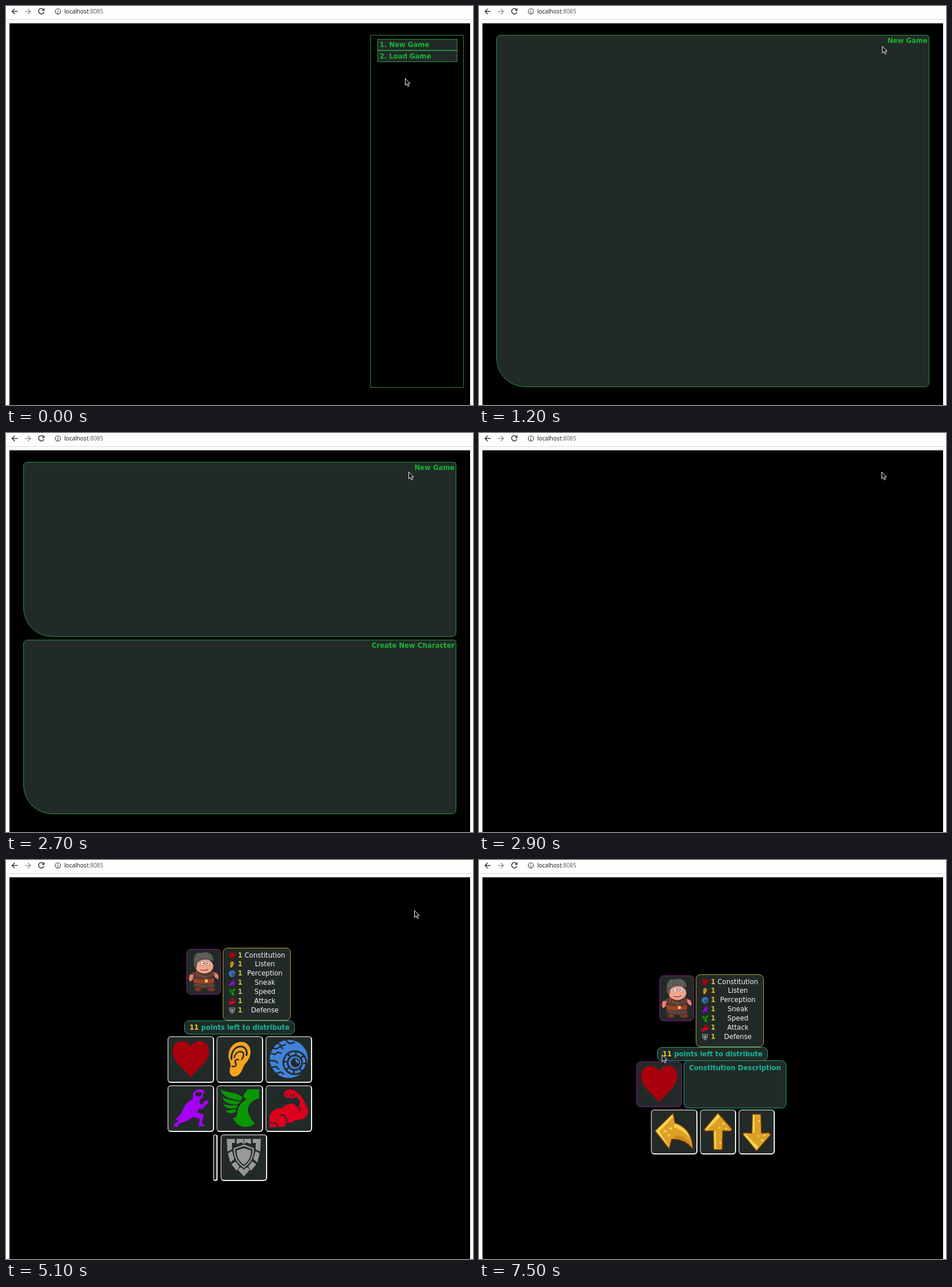
An HTML page for the animation above (8000 ms loop, 810x691 px).

```html
<!DOCTYPE html>
<html lang="en">
<head>
<meta charset="utf-8">
<title>Character creation</title>
<style>
  :root { --panel: #222a28; --line: #27913c; --green: #17b532; --teal: #14b698; --gold: #d3bf2b; }
  html, body { margin: 0; width: 100%; height: 100%; overflow: hidden; background: #fefffc; }
  #stage { position: relative; width: 810px; height: 691px; overflow: hidden; font: 11.6px/18px "DejaVu Sans", sans-serif; }
  #stage div, #stage svg { position: absolute; box-sizing: border-box; white-space: nowrap; }
  #stage svg { overflow: visible; }
  #stage .scene { inset: 0; }
  .bar { left: 0; top: 0; width: 810px; height: 24px; border-bottom: 1px solid #d6d6d4; }
  .url { left: 101px; top: 0; font: 10px/18px "Noto Sans", sans-serif; color: #222; }
  .url span { color: #666; }
  .game { left: 6px; top: 30px; width: 799px; height: 661px; background: #000; }

  .panel { left: 30px; width: 751px; background: var(--panel); border: 1px solid var(--line); border-radius: 7px 4px 7px 50px; }
  .panel, .item { color: var(--green); font-weight: bold; }
  .panel { text-align: right; padding-right: 2px; }
  .menu { left: 632px; top: 50px; width: 162px; height: 611px; border: 1px solid #2c8741; }
  .item { left: 11px; width: 139px; height: 20px; padding-left: 3px; background: var(--panel); border: 1px solid var(--line); }

  .frame { background: var(--panel); border: 1px solid #8d1590; border-radius: 7px; }
  .table { left: 295px; top: 280px; width: 118px; height: 126px; background: var(--panel); border: 1px solid #a9a433; border-radius: 8px; }
  .row { left: 1px; width: 116px; height: 16px; line-height: 16px; color: #f4f4f4; }
  .row svg { left: 7px; top: 2px; }
  .row b { position: absolute; left: 24px; color: var(--gold); }
  .row div { left: 29px; width: 84px; text-align: center; }
  .teal { background: var(--panel); border: 1px solid #17a184; border-radius: 8px; color: var(--teal); font-weight: bold; text-align: center; }
  .teal b { color: #e3cf2c; }
  .btn { background: var(--panel); border: 2px solid; border-color: #929292 #f0f0f0 #f0f0f0 #929292; border-radius: 6px; }
  .btn svg { left: -2px; top: -2px; }

  .timed { animation: 8s step-end infinite; }
  #start { animation-name: start; }
  #newGame { animation-name: newGame; }
  #pick { animation-name: pick; }
  #create { animation-name: create; }
  #statMenu { animation-name: statMenu; }
  #manual { animation-name: manual; }
  #stats { animation-name: stats; }
  #grid { animation-name: grid; }
  #detail { animation-name: detail; }
  #cursor { left: -.5px; top: -.5px; animation-name: cursor; }
  #arrow { animation-name: arrow; }
  #beam { animation-name: beam; }
  @keyframes start { 0% { visibility: visible } 15%, 100% { visibility: hidden } }
  @keyframes newGame { 0%, 21.25%, 100% { visibility: hidden } 15% { visibility: visible } }
  @keyframes pick { 0%, 33.75%, 100% { visibility: hidden } 21.25% { visibility: visible } }
  @keyframes create { 0%, 36.25%, 100% { visibility: hidden } 33.75% { visibility: visible } }
  @keyframes statMenu { 0%, 60%, 100% { visibility: hidden } 40% { visibility: visible } }
  @keyframes manual { 0%, 63.75%, 100% { visibility: hidden } 60% { visibility: visible } }
  @keyframes grid { 0%, 93.75%, 100% { visibility: hidden } 63.75% { visibility: visible } }
  @keyframes detail { 0% { visibility: hidden } 93.75%, 100% { visibility: visible } }
  @keyframes stats {
    0% { visibility: hidden; transform: none }
    37.5% { visibility: visible; transform: translate(81px, 0) }
    40% { visibility: visible; transform: none }
    60% { visibility: visible; transform: translate(81px, -82px) }
    63.75% { visibility: visible; transform: translate(81px, -128px) }
    93.75%, 100% { visibility: visible; transform: translate(81px, -82px) }
  }
  @keyframes cursor {
    0% { transform: translate(692px, 125px) }
    7.5% { transform: translate(682px, 108px) }
    8.75% { transform: translate(689px, 88px) }
    10% { transform: translate(699px, 69px) }
    28.75% { transform: translate(698px, 67px) }
    40% { transform: translate(698px, 67px); animation-timing-function: steps(4) }
    45% { transform: translate(694px, 128px); animation-timing-function: steps(4) }
    50% { transform: translate(701px, 106px) }
    51.25% { transform: translate(706px, 93px) }
    53.75% { transform: translate(707px, 88px) }
    55% { transform: translate(708px, 84px) }
    60% { transform: translate(708px, 87px) }
    66.25% { transform: translate(708px, 87px); animation-timing-function: steps(5) }
    72.5% { transform: translate(430px, 541px); animation-timing-function: steps(4) }
    77.5% { transform: translate(332px, 322px) }
    78.75% { transform: translate(327px, 329px) }
    80% { transform: translate(312px, 334px) }
    81.25% { transform: translate(305px, 336px) }
    82.5%, 100% { transform: translate(317px, 337px) }
  }
  @keyframes arrow {
    0%, 15%, 33.75%, 42.5%, 60%, 100% { visibility: visible }
    8.75%, 21.25%, 40%, 53.75% { visibility: hidden }
  }
  @keyframes beam {
    0%, 15%, 33.75%, 42.5%, 60%, 100% { visibility: hidden }
    8.75%, 21.25%, 40%, 53.75% { visibility: visible }
  }
</style>
</head>
<body>
<svg width="0" height="0" style="position:absolute">
  <symbol id="heart" viewBox="0 0 80 80">
    <path fill="#a9000d" d="M40.5 72C33 60 9 46 9 26C9 6 33 3 40.5 18C48 3 72 6 72 26C72 46 48 60 40.5 72Z"/>
  </symbol>
  <symbol id="ear" viewBox="0 0 80 80">
    <path fill="#f6a41e" d="M21 37C20 20 31 10 43 10C56 10 62 23 58 35C55 44 49 47 46 55C43 64 37 71 30 70C22 68 22 60 24 53C26 47 22 43 21 37Z"/>
    <g fill="none" stroke="#222a28" stroke-linecap="round">
      <path stroke-width="3" d="M26 40C25 26 34 17 43 18C51 19 54 26 52 33"/>
      <path stroke-width="2.4" d="M31 37C33 27 43 24 47 30C48 34 46 37 44 40M27 52C32 55 36 50 33 46C31 43 35 39 38 41"/>
    </g>
  </symbol>
  <symbol id="eye" viewBox="0 0 80 80">
    <circle cx="40.5" cy="39.5" r="33" fill="#4182da"/>
    <g fill="none" stroke="#222a28">
      <path stroke-width="2.4" d="M8 29L16 32L21 28L28 30M12 21L20 22L25 18L31 22M21 12L29 17L36 14M35 7L42 13L51 11M7 42L17 43L22 47M10 54L19 53L24 58M18 65L27 62L32 66"/>
      <circle cx="51" cy="46" r="20" stroke-width="2.8"/>
      <circle cx="51" cy="46" r="16.5" stroke-width="4.5" stroke-dasharray="3 9.96"/>
      <circle cx="51" cy="46" r="12.5" stroke-width="3"/>
    </g>
    <circle cx="52" cy="46" r="8" fill="#222a28"/>
    <path fill="#4182da" d="M51 40A6 6 0 0 1 58 47L54 46Z"/>
  </symbol>
  <symbol id="sneak" viewBox="0 0 80 80">
    <path fill="#a500f3" d="M44 17C45 9 54 5 63 8L65 13L61 15L62 21L57 24L55 30L59 34L65 27L70 26L71 31L66 35L60 42L54 40L52 47L63 51L60 66L66 71H54L56 58L45 55L34 62L21 66L18 72H11L13 66L20 62L13 59C22 54 24 48 27 42C30 33 36 28 44 24Z"/>
    <path fill="#222a28" d="M48 15C51 11 57 11 60 13L58 19L51 20Z"/>
  </symbol>
  <symbol id="speed" viewBox="0 0 80 80">
    <path fill="#0b9604" d="M54 7H74V23C60 26 53 35 55 47C57 56 63 61 66 67C57 74 43 74 35 66L28 57C38 57 35 47 38 40C41 32 46 28 52 25L46 19Z"/>
    <path fill="#0b9604" d="M7 8C18 13 34 11 45 21L42 27C27 24 12 22 7 8ZM10 20C19 27 31 25 41 29L38 33C26 34 13 31 10 20ZM12 32C20 37 29 34 37 35L35 39C25 42 14 40 12 32ZM16 43C22 45 28 42 34 41L33 46C26 50 19 50 16 43Z"/>
  </symbol>
  <symbol id="attack" viewBox="0 0 80 80">
    <path fill="#da001e" d="M7 73V55C9 45 18 39 28 40C34 33 46 29 53 35L59 35L60 28L54 20L47 23L35 21C30 18 31 11 36 9C42 6 50 7 54 12C62 17 69 29 74 43C74 55 66 62 52 60C47 66 40 66 37 64L33 72Z"/>
    <path fill="none" stroke="#222a28" stroke-width="2" d="M9 66C16 64 20 67 22 72M25 52C33 50 39 57 36 64M53 35C58 37 60 41 60 45M37 18V14M43 20V16M48 20V15"/>
  </symbol>
  <symbol id="shield" viewBox="0 0 80 80">
    <g fill="#999">
      <g id="plates">
        <path d="M11 8H25V15H20V26L12 30ZM28 8H40V17L36 14L28 17ZM13 33L20 29L24 43L17 49ZM19 52L26 47L33 56L28 63ZM30 61L35 57L40.5 61V73Z"/>
      </g>
      <use href="#plates" transform="matrix(-1 0 0 1 81 0)"/>
      <path d="M40.5 24L53 28C53 40 49 46 40.5 53C32 46 28 40 28 28Z"/>
    </g>
    <path fill="none" stroke="#999" stroke-width="2.4" d="M40.5 19L57 25C57 41 51 49 40.5 57C30 49 24 41 24 25Z"/>
  </symbol>
  <symbol id="up" viewBox="0 0 62 78">
    <path fill="#dca027" stroke="#67330d" stroke-width="1.6" stroke-linejoin="round" d="M31.5 6L56 34L53 38L40 37L39 70L24 70L23 37L10 38L7 35Z"/>
    <path fill="#f2d34d" d="M31 8L35 13L13 35L9 35ZM25 38H28V68H25Z"/>
    <path fill="none" stroke="#f2d34d" stroke-width="3" stroke-linecap="round" d="M40 25h2M34 32h1M45 33h1M35 58h1"/>
  </symbol>
  <symbol id="back" viewBox="0 0 80 78">
    <path fill="#dca027" stroke="#67330d" stroke-width="1.6" stroke-linejoin="round" d="M7 37L39 6L42 23C59 28 73 43 73 69C63 56 50 51 36 52L32 69Z"/>
    <path fill="#c98a18" d="M72 67C63 55 51 49 38 50L44 45C58 46 68 54 72 67Z"/>
    <path fill="#f2d34d" d="M9 37L37 9L38 14L15 38L30 62L31 65ZM41 25C54 29 64 38 68 50C60 40 51 34 40 31Z"/>
    <path fill="none" stroke="#f2d34d" stroke-width="3.5" stroke-linecap="round" d="M24 38h2M31 45h1M34 33h2"/>
  </symbol>
</svg>

<div id="stage">
  <div class="bar"></div>
  <svg width="100" height="23" fill="none" stroke="#383838" stroke-width="1.5">
    <path d="M20 9.5H10.8M15.2 4.8L10.5 9.5L15.2 14.2"/>
    <path stroke="#999" d="M33 9.5H42.2M37.8 4.8L42.5 9.5L37.8 14.2"/>
    <path d="M65 6.2A4.7 4.7 0 1 0 65.8 10.5"/>
    <path fill="#383838" stroke="none" d="M66.7 3.8V8.6H61.9Z"/>
    <circle cx="90" cy="9.3" r="4.6" stroke-width="1.1"/>
    <path stroke-width="1.2" d="M90 8.7V12M90 6.4V7.6"/>
  </svg>
  <div class="url">localhost<span>:8085</span></div>
  <div class="game"></div>

  <div id="start" class="scene timed"></div>
  <div id="newGame" class="scene timed"><div class="panel" style="top:50px;height:610px">New Game</div></div>
  <div id="pick" class="scene timed"><div class="panel" style="top:50px;height:610px;width:565px">New Game</div></div>
  <div id="create" class="scene timed">
    <div class="panel" style="top:50px;height:303px">New Game</div>
    <div class="panel" style="top:358px;height:302px">Create New Character</div>
  </div>
  <div id="statMenu" class="scene timed"></div>
  <div id="manual" class="scene timed"><div class="panel" style="top:358px;height:302px">Manual Stats</div></div>
  <div id="grid" class="scene timed"></div>
  <div id="detail" class="scene timed">
    <div class="frame" style="left:273px;top:349px;width:79px;height:79px"><svg width="80" height="80" style="left:-2px;top:-2px"><use href="#heart"/></svg></div>
    <div class="teal" style="left:355px;top:347px;width:178px;height:83px;line-height:24px">Constitution Description</div>
  </div>

  <div id="stats" class="scene timed">
    <div class="frame" style="left:232px;top:282px;width:60px;height:79px">
      <svg width="58" height="77">
        <g fill="#7c3226"><ellipse cx="19" cy="69" rx="6" ry="3.5"/><ellipse cx="42" cy="69" rx="7" ry="3.5"/><path d="M17 61h7v8h-7zM37 61h7v8h-7z"/></g>
        <path fill="none" stroke="#874034" stroke-width="7" stroke-linecap="round" d="M17 41L10 45M43 41L48 43"/>
        <path fill="#e9806e" d="M5 43L11 44L10 52L5 56L3 50ZM47 41C53 40 56 45 54 52L48 48Z"/>
        <path fill="#543a33" d="M14 38C24 43 36 43 44 38L48 65C37 69 21 68 11 64Z"/>
        <path fill="none" stroke="#7d685f" stroke-width="2" stroke-dasharray="2 2.5" d="M16 44C25 48 35 48 43 44M15 61C25 64 37 64 46 61"/>
        <path fill="#9d4127" d="M11 50C24 53 37 53 47 50V57C36 60 22 60 11 57Z"/>
        <path fill="none" stroke="#9d4127" stroke-width="2" d="M16 39L34 52"/>
        <rect x="31" y="52" width="5" height="5" fill="#e0c954"/>
        <ellipse cx="30" cy="29" rx="15.5" ry="12.5" fill="#f3a48f"/>
        <path fill="#595553" d="M12 23C10 11 17 3 24 6C37 2 46 8 46 20C34 16 24 17 18 23L16 34C13 31 11 27 12 23Z"/>
        <path fill="none" stroke="#85807c" stroke-width="1.5" stroke-dasharray="2 3" d="M15 18C23 10 33 11 42 16M19 10C27 8 35 8 40 11"/>
        <g fill="#fff" stroke="#403030" stroke-width=".6"><circle cx="27" cy="24" r="3.4"/><circle cx="36.5" cy="24" r="3.2"/></g>
        <circle cx="28" cy="24" r="1"/><circle cx="36" cy="24" r="1"/>
        <path fill="none" stroke="#693229" stroke-width="1.2" d="M23 35C28 37 34 36 37 34"/>
      </svg>
    </div>
    <div class="table"></div>
    <div class="teal" style="left:228px;top:406px;width:192px;height:24px;line-height:22px"><b>11</b> points left to distribute</div>
  </div>

  <div id="cursor" class="timed">
    <svg id="arrow" class="timed" width="10" height="15"><path d="M.5 .5V12.4L3.2 9.9L5.2 14.3L7.2 13.4L5.2 9.1H9Z" fill="#111" stroke="#eee"/></svg>
    <svg id="beam" class="timed" width="8" height="14" fill="none">
      <path stroke="#e4e4e4" stroke-width="2.6" d="M-3 -6H3M-3 6H3M0 -6V6"/>
      <path stroke="#333" stroke-width=".8" d="M-3 -6H3M-3 6H3M0 -6V6"/>
    </svg>
  </div>
</div>

<script>
  const $ = q => document.querySelector(q);
  const add = (q, html) => $(q).insertAdjacentHTML('beforeend', html);
  const icon = (id, w, h, extra = '') => `<svg width="${w}" height="${h}" ${extra}><use href="#${id}"/></svg>`;
  const button = (x, y, w, h, art = '') =>
    `<div class="btn" style="left:${x}px;top:${y}px;width:${w}px;height:${h}px">${art}</div>`;
  const menu = labels => `<div class="menu">${labels.map((label, i) =>
    `<div class="item" style="top:${6 + i * 19.5}px">${i + 1}. ${label}</div>`).join('')}</div>`;

  add('#start', menu(['New Game', 'Load Game']));
  add('#pick', menu(['New Character']));
  add('#statMenu', menu(['Random Stats', 'Manual Stats']));

  const stats = [
    ['heart', 'Constitution'], ['ear', 'Listen'], ['eye', 'Perception'], ['sneak', 'Sneak'],
    ['speed', 'Speed'], ['attack', 'Attack'], ['shield', 'Defense']
  ];
  stats.forEach(([id, name], i) => {
    add('.table', `<div class="row" style="top:${3.6 + i * 15.85}px">${icon(id, 14, 14)}<b>1</b><div>${name}</div></div>`);
    const x = i < 6 ? 280 + i % 3 * 85 : 372;
    add('#grid', button(x, 304.5 + Math.floor(i / 3) * 85, 81, 81, icon(id, 80, 80)));
  });
  add('#grid', button(359, 474.5, 8, 81));

  add('#detail', button(298, 432, 81, 78, icon('back', 80, 78)));
  add('#detail', button(383, 432, 63, 78, icon('up', 62, 78)));
  add('#detail', button(450, 432, 63, 78, icon('up', 62, 78, 'style="transform:scaleY(-1)"')));
</script>
</body>
</html>
```
